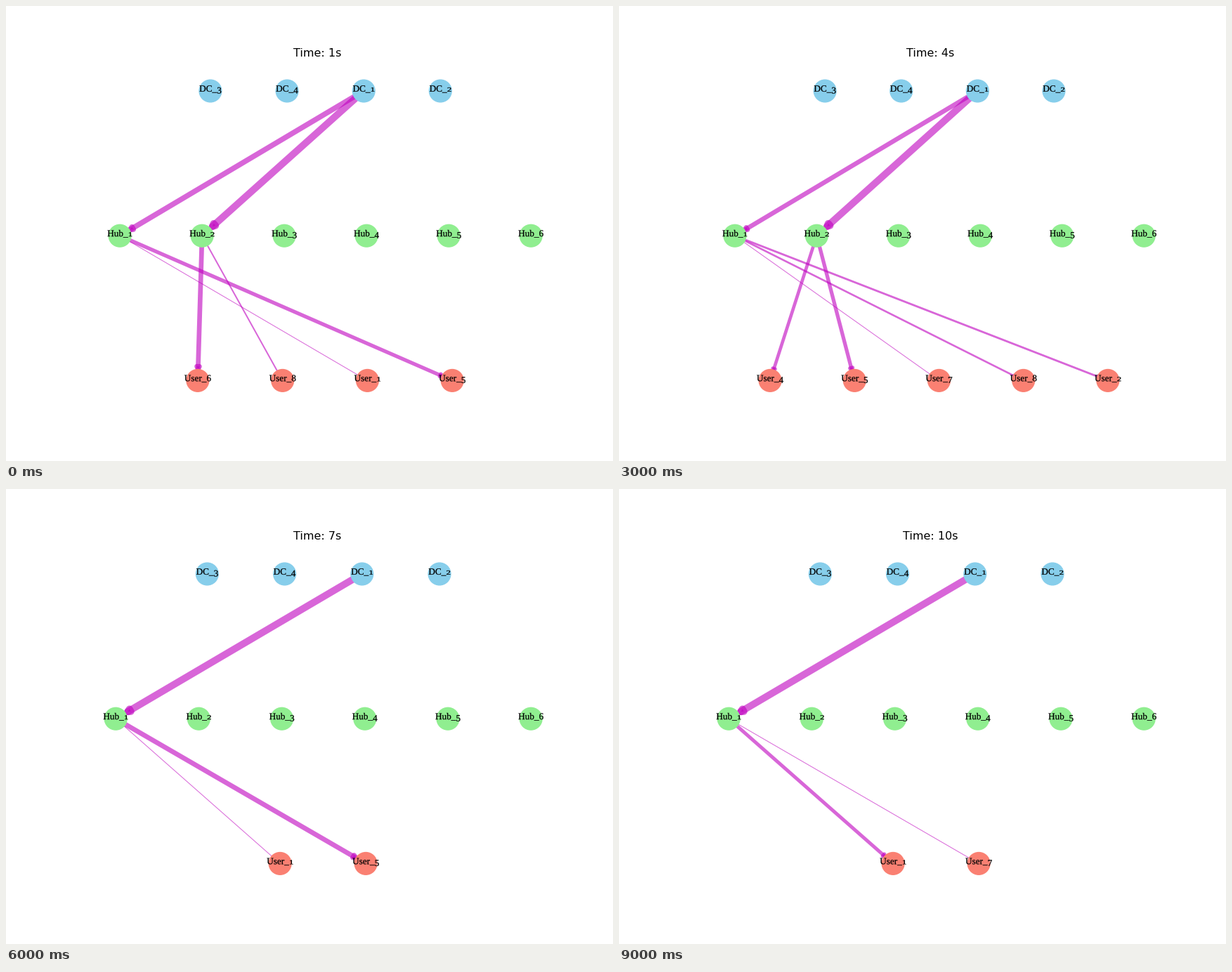
These frames come from a looping animation (864 by 648 pixels, 10000 ms). A matplotlib script:

```python
import matplotlib.pyplot as plt
from matplotlib.animation import FuncAnimation
from matplotlib.patches import FancyArrowPatch, PathPatch
from matplotlib.textpath import TextPath
from matplotlib.transforms import Affine2D

W, H, DPI = 864, 648, 72
LEFT, RIGHT = 138.4, 747.2              # usable span of the network
ROW = {"DC": 527.0, "Hub": 320.8, "User": 114.6}
GAP = {"DC": 0.9325, "Hub": 1.0, "User": 1.032}
SHIFT = {"DC": 0, "Hub": 0, "User": -0.005}
COLOR = {"DC": "skyblue", "Hub": "lightgreen", "User": "salmon"}
FLOW = (0.75, 0, 0.75, 0.6)
SERIF = {"family": "Liberation Serif"}

DEMAND = dict(zip("1245678", (1.8, 2.8, 4.6, 5.2, 6.3, 1.0, 2.6)))

# Active users each second, and the hub that serves each of them
STEPS = [("6815", "2211"), ("45781", "22111"), ("24", "11"),
         ("45782", "22111"), ("124568", "121231"), ("46", "12"),
         ("15", "11"), ("6715", "2111"), ("4", "1"), ("17", "11")]

fig = plt.figure(figsize=(W / DPI, H / DPI), dpi=DPI, facecolor="white")
ax = fig.add_subplot()


def flows(users, hubs):
    """Load of every edge: a hub takes in the sum of what it hands out."""
    loads = {}
    for hub in sorted(set(hubs)):
        total = sum(DEMAND[u] for u, h in zip(users, hubs) if h == hub)
        loads[("DC", "1"), ("Hub", hub)] = total
    for user, hub in zip(users, hubs):
        loads[("Hub", hub), ("User", user)] = DEMAND[user]
    return loads


def layout(users, edges):
    """Centre each row, then fit nodes and padded edge bounds to the span."""
    rows = {"DC": "3412", "Hub": "123456", "User": users}
    unit = {(kind, n): (i - (len(ids) - 1) / 2) * GAP[kind] + SHIFT[kind]
            for kind, ids in rows.items() for i, n in enumerate(ids)}
    used = [unit[node] for edge in edges for node in edge]
    pad = 0.05 * (max(used) - min(used))
    lo = min(min(unit.values()), min(used) - pad)
    hi = max(max(unit.values()), max(used) + pad)
    scale = (RIGHT - LEFT) / (hi - lo)
    return {k: (LEFT + (x - lo) * scale, ROW[k[0]]) for k, x in unit.items()}


def label(kind, n, x, y):
    """Serif label with an old-style numeral."""
    stem = TextPath((0, 0), kind + "_", size=13.2, prop=SERIF)
    digit = TextPath((0, 0), n, size=13.2, prop=SERIF)
    form = Affine2D()
    if n in "12":
        form.scale(1, 0.68)
    elif n in "3457":
        form.translate(0, -2.6)
    digit = digit.transformed(form.translate(stem.get_extents().x1, 0))
    mid = (stem.get_extents().x0 + digit.get_extents().x1) / 2
    move = Affine2D().translate(x - mid, y - 0.9)
    for part in (stem, digit):
        ax.add_patch(PathPatch(part.transformed(move), facecolor="black",
                               edgecolor="black", linewidth=0.25, zorder=3))


def draw(frame):
    users, hubs = STEPS[frame]
    loads = flows(users, hubs)
    pos = layout(users, loads)
    low = min(loads.values())
    spread = max(loads.values()) - low or 1

    ax.clear()
    ax.axis("off")
    box = ax.get_position()
    ax.set(xlim=(box.x0 * W, box.x1 * W), ylim=(box.y0 * H, box.y1 * H))
    ax.set_title(f"Time: {frame + 1}s", fontsize=16, family="DejaVu Sans")

    for (start, end), load in loads.items():
        ax.add_patch(FancyArrowPatch(
            pos[start], pos[end], arrowstyle="-|>", mutation_scale=10,
            linewidth=1 + 9 * (load - low) / spread, color=FLOW,
            shrinkA=8.66, shrinkB=8.66, zorder=1))
    ax.scatter(*zip(*pos.values()), s=1000, linewidths=1.5, zorder=2,
               c=[COLOR[kind] for kind, _ in pos])
    for (kind, n), (x, y) in pos.items():
        label(kind, n, x, y)


anim = FuncAnimation(fig, draw, frames=len(STEPS), init_func=lambda: None,
                     interval=1000, repeat=True, repeat_delay=0)
plt.show()
```
